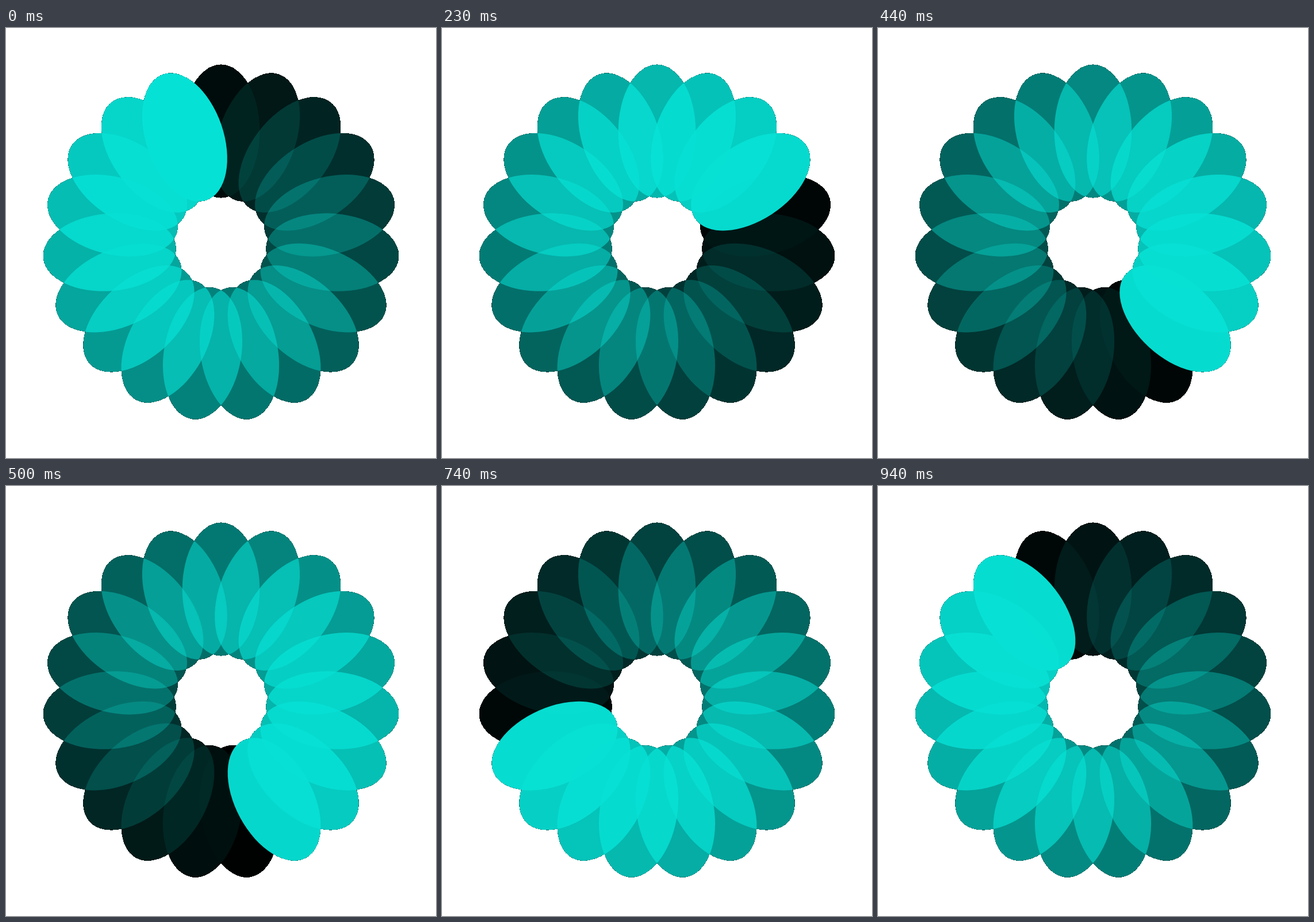
These frames come from a looping animation (748 px wide and 748 px high, 970 ms). An HTML page with a canvas:

```html
<!DOCTYPE html>
<html lang="en">
<head>
<meta charset="utf-8">
<title>Petal spinner</title>
<style>
  html, body { margin: 0; height: 100%; overflow: hidden; background: #fff; }
  canvas { display: block; }
</style>
</head>
<body>
<canvas id="stage" width="748" height="748"></canvas>
<script>
const SIZE = 748, UNIT = SIZE / 100;
const PETALS = 19, STEPS = 29, LOOP = 970, STEP_MS = 33.49;
const TEAL = '#06e1d5';

const ctx = document.getElementById('stage').getContext('2d');

function petal(c, i) {
  const angle = i / PETALS * 2 * Math.PI;
  const x = SIZE / 2 + 26 * UNIT * Math.sin(angle);
  const y = SIZE / 2 - 26 * UNIT * Math.cos(angle);
  c.beginPath();
  c.ellipse(x, y, 9 * UNIT, 15.5 * UNIT, angle, 0, 2 * Math.PI);
  c.fill();
}

// Black flower with hard, unsmoothed edges
function makeSilhouette() {
  const canvas = document.createElement('canvas');
  canvas.width = canvas.height = SIZE;
  const c = canvas.getContext('2d');
  for (let i = 0; i < PETALS; i++) petal(c, i);
  const image = c.getImageData(0, 0, SIZE, SIZE);
  for (let k = 3; k < image.data.length; k += 4) {
    image.data[k] = image.data[k] > 110 ? 255 : 0;
  }
  c.putImageData(image, 0, 0);
  return canvas;
}

const silhouette = makeSilhouette();

function draw(now) {
  const tick = Math.floor(now % LOOP / 10) * 10;
  const phase = Math.floor((tick + 5) / STEP_MS) / STEPS;

  ctx.globalCompositeOperation = 'source-over';
  ctx.globalAlpha = 1;
  ctx.clearRect(0, 0, SIZE, SIZE);
  ctx.drawImage(silhouette, 0, 0);

  // Each petal flashes in turn, then fades linearly over one loop
  ctx.globalCompositeOperation = 'source-atop';
  ctx.fillStyle = TEAL;
  for (let i = 0; i < PETALS; i++) {
    ctx.globalAlpha = 1 - (phase + (PETALS - 1 - i) / PETALS) % 1;
    petal(ctx, i);
  }
}

const start = performance.now();
function loop() {
  draw(performance.now() - start);
  requestAnimationFrame(loop);
}
loop();
</script>
</body>
</html>
```
